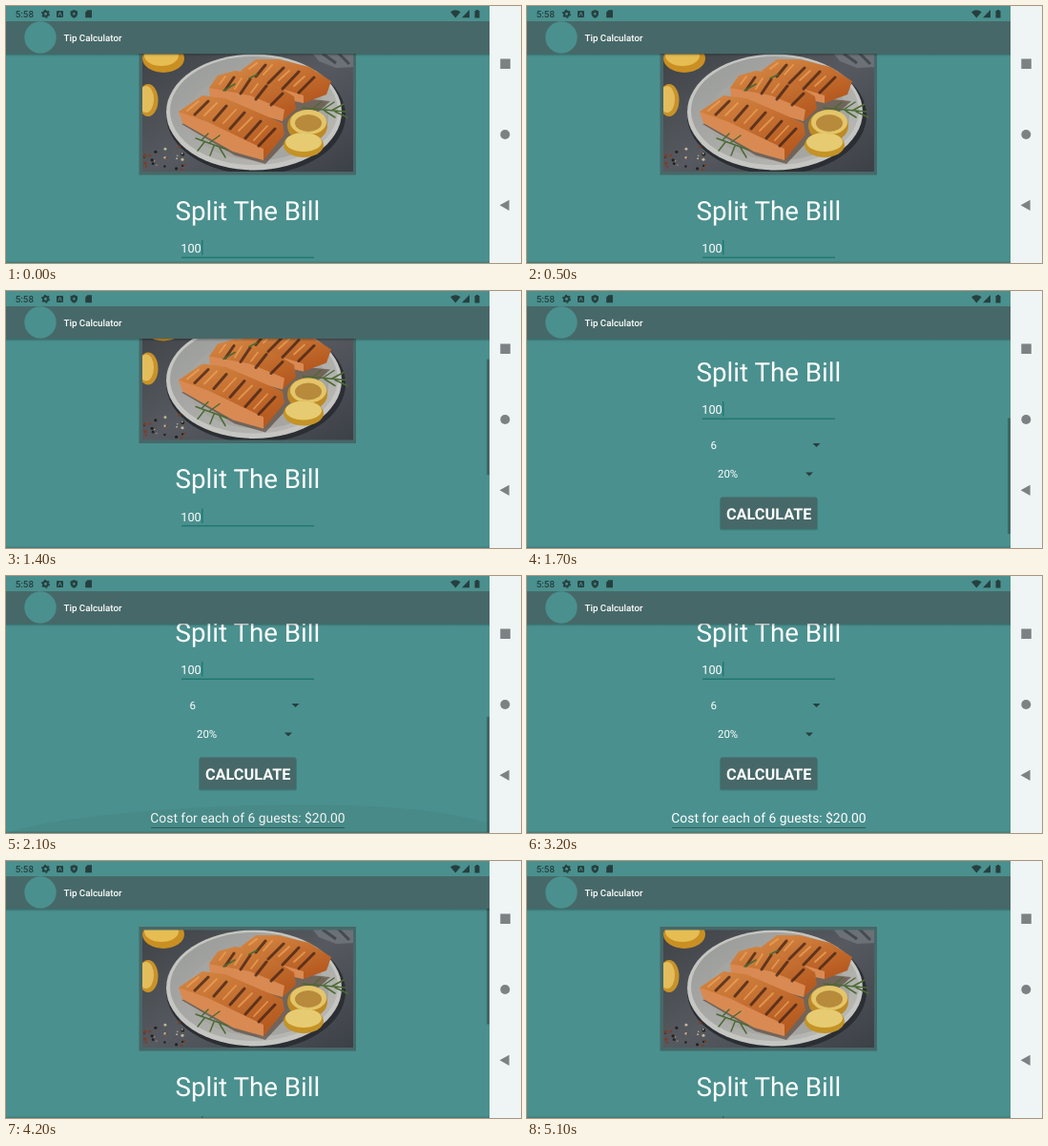
Write an HTML page that moves like this. It is 540x270 px and loops after 5.3 s.

```html
<!DOCTYPE html>
<html lang="en">
<head>
<meta charset="utf-8">
<title>Tip Calculator</title>
<style>
  html, body { margin: 0; width: 100%; height: 100%; overflow: hidden; background: #4a908e; }
  svg { display: block; width: 540px; height: 270px; font-family: Roboto, sans-serif; text-rendering: geometricPrecision; }
  text { fill: #fff; white-space: pre; }
  .mid { text-anchor: middle; }
  .ink { fill: #263f3f; }
  .bar { fill: #476868; }
  .nav { fill: #7c8284; }
  .fish { fill: url(#flesh); }
  .side { fill: #d98a52; }
  .char { stroke: #3f2014; stroke-width: 3; stroke-linecap: round; fill: none; opacity: .75; }
  .glaze { stroke: #efa65c; stroke-width: 1.8; stroke-linecap: round; fill: none; opacity: .7; }
  .dill { stroke: #4c6a34; stroke-width: 1.5; stroke-linecap: round; fill: none; }
</style>
</head>
<body>
<svg viewBox="0 0 540 270">
  <defs>
    <linearGradient id="slate" x2="1" y2="1">
      <stop offset="0" stop-color="#3e4145"/>
      <stop offset=".5" stop-color="#565a60"/>
      <stop offset="1" stop-color="#3a3e45"/>
    </linearGradient>
    <linearGradient id="plate" x2="1" y2="1">
      <stop offset="0" stop-color="#989a98"/>
      <stop offset="1" stop-color="#bcbbb7"/>
    </linearGradient>
    <linearGradient id="flesh" x2=".6" y2="1">
      <stop offset="0" stop-color="#d58845"/>
      <stop offset="1" stop-color="#b65a20"/>
    </linearGradient>
    <linearGradient id="shade" x2="0" y2="1">
      <stop offset="0" stop-opacity=".28"/>
      <stop offset="1" stop-opacity="0"/>
    </linearGradient>
    <filter id="soft"><feGaussianBlur stdDeviation=".7"/></filter>
    <clipPath id="view"><path d="M0 50H507V270H0z"/></clipPath>
    <clipPath id="photo"><path d="M143 72.5H364V196H143z"/></clipPath>
  </defs>

  <rect width="540" height="270" fill="#4a908e"/>

  <g clip-path="url(#view)">
    <g id="page">
      <rect class="bar" x="139.5" y="69" width="227.5" height="130.5"/>
      <g clip-path="url(#photo)"><g filter="url(#soft)">
        <rect x="138" y="67" width="231" height="135" fill="url(#slate)"/>
        <path d="M320 70L328 80L346 87L368 86V70z" fill="#6b7176"/>
        <path d="M332 72L346 82M348 71L360 83" stroke="#454b51" stroke-width="3"/>
        <ellipse cx="165" cy="77" rx="22" ry="15" fill="#c98f22"/>
        <ellipse cx="163" cy="74" rx="18" ry="11" fill="#e6bd52"/>
        <ellipse cx="149" cy="121" rx="10.5" ry="17" fill="#c8922a"/>
        <ellipse cx="147" cy="120" rx="8" ry="14" fill="#e3bd5c"/>
        <ellipse cx="262" cy="137" rx="94" ry="62" fill="#2b2e33"/>
        <ellipse cx="260" cy="133.5" rx="92" ry="61" fill="#c5c5c1"/>
        <ellipse cx="260" cy="132" rx="88" ry="57" fill="url(#plate)"/>
        <ellipse cx="264" cy="138" rx="74" ry="46" fill="#a5a5a1"/>
        <path d="M184 146L240 179L272 188L298 160L340 122L300 118z" fill="#4f3a2c" opacity=".6"/>

        <path class="fish" d="M246 90L262 78L286 78L318 86L341 101L336 115L312 124L286 118L252 100z"/>
        <path class="side" d="M246 90L286 108L312 116L312 124L284 118L250 101z"/>
        <path class="fish" d="M213 108L222 95L240 90L262 93L302 117L304 130L290 143L216 118z"/>
        <path class="side" d="M213 108L256 116L292 131L290 143L250 132L214 117z"/>
        <path class="fish" d="M181 133L206 116L230 119L290 145L292 157L270 184L240 175L186 144z"/>
        <path class="side" d="M181 133L212 144L270 172L270 184L238 175L185 145z"/>
        <path class="char" d="M262 96L272 84M275 103L291 87M290 109L307 91M307 113L323 97M230 110L239 97M246 114L256 99M262 120L273 106M278 126L290 114M198 136L212 122M218 142L231 127M235 151L250 134M251 161L267 143M265 169L282 151"/>
        <path class="glaze" d="M255 88L263 82M270 94L279 84M286 100L297 90M302 106L313 96M224 104L230 96M240 109L247 98M257 113L264 104M190 132L202 122M208 137L221 124M228 145L241 131M244 153L258 139M260 163L274 148"/>

        <ellipse cx="316" cy="148" rx="21" ry="17" fill="#bd8a26"/>
        <ellipse cx="317" cy="144" rx="19" ry="13" fill="#e4c569"/>
        <ellipse cx="317" cy="145" rx="14" ry="9" fill="#b78a3c"/>
        <ellipse cx="312" cy="168" rx="21" ry="13" fill="#c49326"/>
        <ellipse cx="312" cy="165" rx="19" ry="10" fill="#e6cb72"/>
        <path class="dill" d="M311 129L356 133M322 130L330 123M332 131L344 123M341 132L354 125M334 132L345 139M345 133L358 139M199 161L232 173M205 163L212 156M213 166L224 158M208 165L201 174M218 169L214 179M224 171L230 181M228 111L240 104M255 98L263 94"/>
        <g id="pepper"></g>
      </g></g>

      <text class="mid" x="253.4" y="246.8" font-size="27.7">Split The Bill</text>

      <text x="183.3" y="281" font-size="12.7">100</text>
      <rect x="205.2" y="268" width="1.2" height="15.5" fill="#14776e"/>
      <rect x="184" y="285.6" width="139" height="1.3" fill="#1c756e"/>

      <text x="192.5" y="318" font-size="11.5">6</text>
      <path class="ink" d="M299.5 312H307.5L303.5 316z"/>
      <text x="200" y="348.3" font-size="11.4">20%</text>
      <path class="ink" d="M292 342.4H300L296 346.4z"/>

      <rect x="202" y="369.5" width="103" height="34" rx="2" opacity=".16"/>
      <rect class="bar" x="203" y="368.5" width="101" height="33.5" rx="1.5"/>
      <text class="mid" x="253.7" y="391.8" font-size="16.3" font-weight="700">CALCULATE</text>

      <text class="mid" x="253.5" y="436.8" font-size="13.85">Cost for each of 6 guests: $20.00</text>
      <rect x="152" y="442" width="203" height="1" fill="#315f5d"/>
    </g>
    <path id="glow" d="M0 270Q70 248 253 241Q430 236 507 260V270z" opacity="0"/>
    <rect id="thumb" x="504" width="3" height="121.5" fill="#3b6866"/>
    <rect y="268.5" width="507" height="1.5" opacity=".12"/>
  </g>

  <rect class="bar" y="16" width="507" height="34"/>
  <rect y="50" width="507" height="3" fill="url(#shade)"/>
  <circle cx="36" cy="33" r="16.7" fill="#4a908e"/>
  <text x="60.5" y="36.8" font-size="9.75" font-weight="500">Tip Calculator</text>

  <text class="ink" x="9.7" y="12" font-size="9.8" font-weight="500">5:58</text>
  <g class="ink">
    <circle cx="41.5" cy="8.3" r="2.5" fill="none" stroke="#263f3f" stroke-width="2"/>
    <circle cx="41.5" cy="8.3" r="3.9" fill="none" stroke="#263f3f" stroke-width="1.2" stroke-dasharray="2 2.08"/>
    <rect x="53" y="5" width="7" height="7" rx="1"/>
    <path d="M71.3 4L75 5.4V8.2Q74.7 11.4 71.3 12.7Q67.9 11.4 67.6 8.2V5.4z"/>
    <path d="M85.5 4.3H90V12.3H83.2V6.6z"/>
    <path d="M466 6.2Q471.3 2.3 476.6 6.2L471.3 12.4z"/>
    <path d="M486 4V12.2H478z"/>
    <path d="M492.8 4H495.2V5H496.5V12.4H491.5V5H492.8z"/>
  </g>
  <path d="M54.8 10.5L56.5 6.5L58.2 10.5M71.3 6.7V9.7M69.8 8.2H72.8" fill="none" stroke="#4a908e"/>

  <rect x="507" width="33" height="270" fill="#eff4f5"/>
  <rect class="nav" x="518.3" y="55.5" width="10.5" height="10.5"/>
  <circle class="nav" cx="523.3" cy="135" r="5"/>
  <path class="nav" d="M517.6 209.3L527.6 203.7V214.9z"/>
</svg>

<script>
  const LOOP = 5300, STEP = 100;
  const BAR_TOP = 50, BAR_RATIO = 0.55;

  // [ms, value] pairs, linear between neighbours
  const scroll = [
    [0, 22], [1300, 22], [1400, 39.5], [1500, 76], [1600, 118], [1700, 152], [1800, 171], [1900, 178],
    [3300, 178], [3400, 165], [3500, 126], [3600, 79], [3700, 36], [3800, 12], [3900, 2], [4000, 0]
  ];
  const thumbFade = [
    [0, 0], [1300, 0], [1400, 1], [2200, 1], [2500, 0],
    [3300, 0], [3400, 1], [4300, 1], [4600, 0]
  ];
  const glowFade = [[0, 0], [1800, 0], [1900, .06], [2100, .045], [2500, 0]];

  const $ = id => document.getElementById(id);

  function at(track, t) {
    const i = track.findIndex(k => k[0] > t);
    if (i < 0) return track[track.length - 1][1];
    const [t0, a] = track[i - 1], [t1, b] = track[i];
    return a + (b - a) * (t - t0) / (t1 - t0);
  }

  // Scattered spice below the plate
  let seed = 11;
  const rand = () => (seed = seed * 16807 % 2147483647) / 2147483647;
  const tones = ['#24211f', '#7b3f28', '#c5b69b'];
  let dots = '';
  for (let i = 0; i < 24; i++) {
    const x = 145 + rand() * 42, y = 170 + rand() * 24;
    dots += `<circle cx="${x}" cy="${y}" r="${.6 + rand() * 1.4}" fill="${tones[i % 3]}"/>`;
  }
  $('pepper').innerHTML = dots;

  function draw(t) {
    const y = at(scroll, t);
    $('page').setAttribute('transform', `translate(0 ${-y})`);
    $('thumb').setAttribute('y', BAR_TOP + y * BAR_RATIO);
    $('thumb').setAttribute('opacity', at(thumbFade, t));
    $('glow').setAttribute('opacity', at(glowFade, t));
  }

  const start = performance.now();
  function tick() {
    const t = (performance.now() - start) % LOOP;
    draw(Math.floor(t / STEP) * STEP);
    requestAnimationFrame(tick);
  }
  tick();
</script>
</body>
</html>
```
